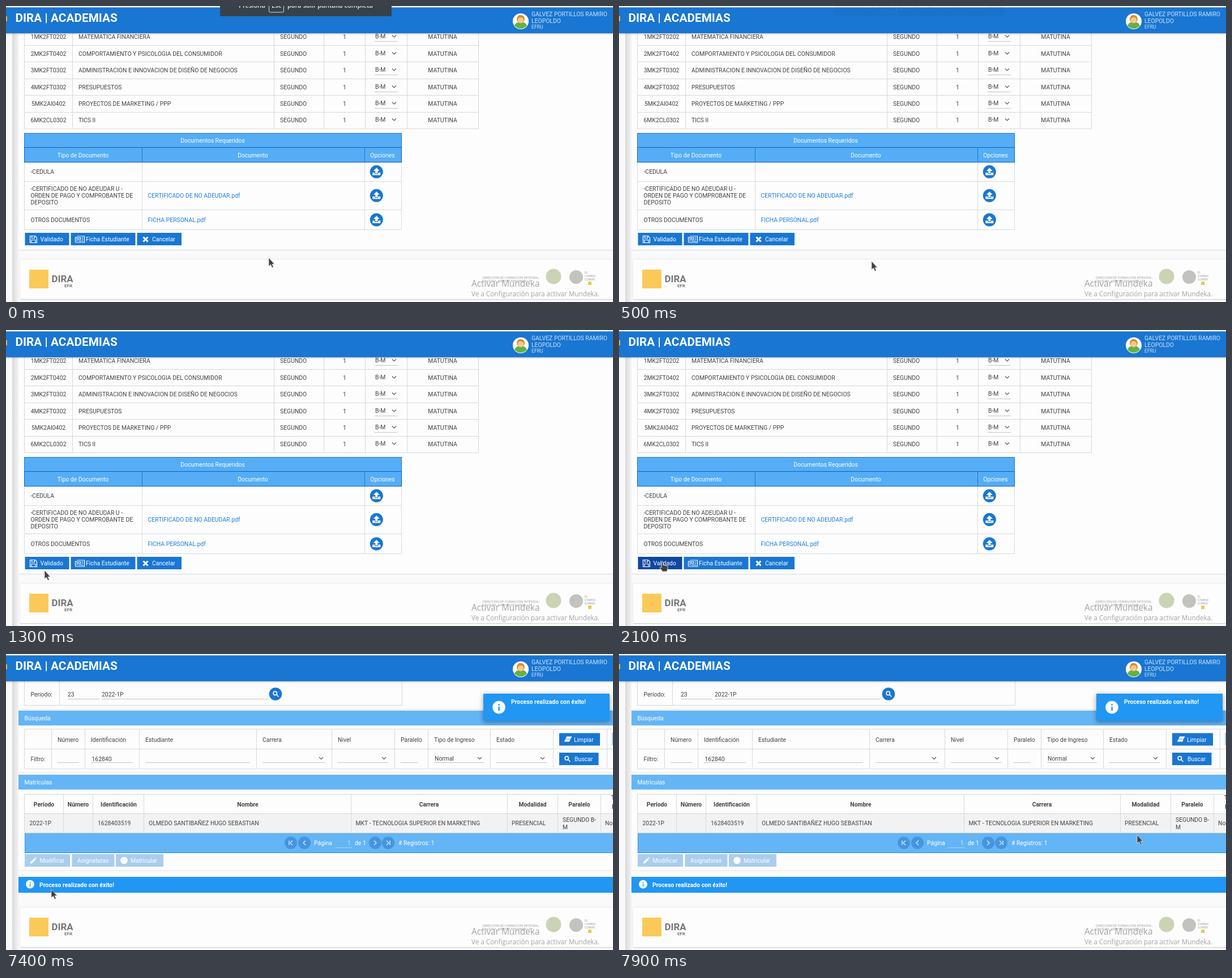
An HTML page that plays this animation: 1072 by 522 pixels, repeating every 8 s.

```html
<!DOCTYPE html>
<html lang="es">
<head>
<meta charset="utf-8">
<title>Matrículas</title>
<style>
html, body { margin: 0; width: 100%; height: 100%; overflow: hidden; background: #fafafa; }
svg { display: block; width: 100%; height: 100%; font: 10.4px Roboto, sans-serif; }
text { fill: #424242; white-space: pre; }
.w { fill: #fff; }
.b { font-weight: 700; }
.m { text-anchor: middle; }
.link { fill: #1e7fdb; }
.user { fill: #cfe2f6; }
.logo { font-weight: 700; fill: #777; }
.mark { font-family: "Open Sans", sans-serif; fill: #a3a3a3; }
.bar { font: 600 11.2px "Open Sans", sans-serif; fill: #eee; }
.crisp { shape-rendering: crispEdges; }
.shade { filter: drop-shadow(0 0 1.5px rgba(0,0,0,.14)); }
.head { filter: drop-shadow(0 1px 1.5px rgba(0,0,0,.3)); }
.toast { filter: drop-shadow(0 2px 4px rgba(0,0,0,.4)); }
</style>
</head>
<body>
<svg id="stage" viewBox="0 0 1072 522"></svg>
<script>
const BLUE = '#1976d2', DARK = '#0d47a1', EDGE = '#0f5fb8', SKY = '#64b5f6', INFO = '#2196f3';
const PALE = '#a9cdef', GRAY = '#d8d8d8', UNDER = '#c4c4c4';

const rect = (x, y, w, h, fill, more = '') =>
  `<rect x="${x}" y="${y}" width="${w}" height="${h}" fill="${fill}" ${more}/>`;
const text = (x, y, s, cls = '', size = '') =>
  `<text x="${x}" y="${y}" class="${cls}"${size && ` style="font-size:${size}px"`}>${s}</text>`;
const disc = (x, y, r, fill) => `<circle cx="${x}" cy="${y}" r="${r}" fill="${fill}"/>`;
const path = (d, fill = 'none', stroke = 'none', width = 1, x = 0, y = 0) =>
  `<path d="${d}" fill="${fill}" stroke="${stroke}" stroke-width="${width}" transform="translate(${x} ${y})"/>`;
const hline = (x1, x2, y, c = GRAY) => rect(x1, y, x2 - x1, 1, c, 'class="crisp"');
const vline = (x, y1, y2, c = GRAY) => rect(x, y1, 1, y2 - y1, c, 'class="crisp"');
const grid = (xs, ys, c) =>
  xs.map(x => vline(x, ys[0], ys.at(-1) + 1, c)).join('') +
  ys.map(y => hline(xs[0], xs.at(-1), y, c)).join('');
const card = (y, h, x = 22) => rect(x, y, 1060, h, '#fdfdfd', 'class="shade"');
const chevron = (x, y) => path('M-3.5 -2L0 1.5L3.5 -2', 'none', '#555', 1.1, x, y);
const button = (x, y, w, label, labelX, fill = BLUE, id = '') =>
  rect(x, y, w, 22, fill, id && `id="${id}"`) + text(labelX, y + 15, label, 'w');
const lens = (x, y) => path('M1.3 1.3L5 5M2 -1.2A3.2 3.2 0 1 1 -4.4 -1.2A3.2 3.2 0 1 1 2 -1.2', 'none', '#fff', 1.6, x, y);
const info = (x, y, r) => disc(x, y, r, '#fff') +
  rect(x - r * .1, y - r * .1, r * .22, r * .62, INFO) + rect(x - r * .1, y - r * .52, r * .22, r * .24, INFO);
const upload = y => disc(654.3, y, 11.5, BLUE) +
  path('M0 -7L5.5 -1.5H2V3H-2V-1.5H-5.5Z M-7 1.5H-3V4H3V1.5H7V6H-7Z', '#fff', 'none', 1, 654.3, y);

function enrolForm() {
  const subjects = [
    ['1MK2FT0202', 'MATEMATICA FINANCIERA'],
    ['2MK2FT0402', 'COMPORTAMIENTO Y PSICOLOGIA DEL CONSUMIDOR'],
    ['3MK2FT0302', 'ADMINISTRACION E INNOVACION DE DISEÑO DE NEGOCIOS'],
    ['4MK2FT0302', 'PRESUPUESTOS'],
    ['5MK2AI0402', 'PROYECTOS DE MARKETING / PPP'],
    ['6MK2CL0302', 'TICS II']];
  const rows = subjects.map(([code, name], i) => {
    const y = Math.round(58.4 + i * 29.4);
    return text(75, y, code, 'm') + text(128, y, name) + text(484, y, 'SEGUNDO') +
      text(598, y, '1', 'm') + text(652, y - 1, 'B-M') + chevron(685.5, y - 4.5) +
      (i % 5 == 1 || i == 5 ? '' : hline(651, 692, y + 4, UNDER)) + text(771, y, 'MATUTINA', 'm');
  }).join('');
  return card(40, 390) + hline(22, 1072, 430, '#d5e3ee') +
    grid([32, 117, 473, 561, 634, 708, 834], [40, 69, 98, 128, 157, 187, 216]) + rows +
    rect(32, 225, 666, 50, '#55adf5') + grid([32, 240, 633, 698], [275, 309, 359, 394], '#d3dbe3') +
    grid([32, 698], [224, 249], BLUE) + grid([32, 698], [249, 275], EDGE) +
    vline(240, 249, 275, BLUE) + vline(633, 249, 275, BLUE) +
    text(365, 241, 'Documentos Requeridos', 'w m') + text(136, 267, 'Tipo de Documento', 'w m') +
    text(436, 267, 'Documento', 'w m') + text(665, 267, 'Opciones', 'w m') +
    text(43.5, 296, '-CEDULA') + text(43.5, 326, '-CERTIFICADO DE NO ADEUDAR U -') +
    text(43.5, 338, 'ORDEN DE PAGO Y COMPROBANTE DE') + text(43.5, 350, 'DEPOSITO') +
    text(43.5, 381, 'OTROS DOCUMENTOS') +
    text(250.5, 338, 'CERTIFICADO DE NO ADEUDAR.pdf', 'link') + text(250.5, 381, 'FICHA PERSONAL.pdf', 'link') +
    [292.3, 334.3, 377].map(upload).join('') +
    button(33.5, 400, 78, 'Validado', 60.5, BLUE, 'validate') +
    button(114.5, 400, 114, 'Ficha Estudiante', 141) + button(231.5, 400, 78.5, 'Cancelar', 258) +
    path('M0 0H9L12 3V12H0ZM3 0V4H8V0M2.5 12V7H9.5V12', 'none', '#fff', 1.2, 42.5, 405.5) +
    path('M3 0H16V11H1Q0 11 0 9V2H3V9M5.5 2.5H9V6H5.5ZM11 3H14M11 5.5H14M5.5 8.5H14', 'none', '#fff', 1.2, 122.5, 406) +
    path('M0 0L8 8M8 0L0 8', 'none', '#fff', 3, 242.5, 407.5);
}

function searchPage() {
  const fields = [
    ['Número', 91, 129], ['Identificación', 150, 224], ['Estudiante', 246, 431],
    ['Carrera', 453, 564, 1], ['Nivel', 586, 675, 1], ['Paralelo', 697, 727],
    ['Tipo de Ingreso', 756, 844, 1], ['Estado', 866, 955, 1]];
  const heads = [['Período', 67], ['Número', 127.5], ['Identificación', 199], ['Nombre', 427],
    ['Carrera', 747], ['Modalidad', 930], ['Paralelo', 1012.5]];
  const pagers = [[503, 'M-3 -4V4M3 -4L-1 0L3 4'], [527, 'M2 -4L-2 0L2 4'],
    [652, 'M-2 -4L2 0L-2 4'], [675, 'M3 -4V4M-3 -4L1 0L-3 4']];
  return card(40, 57) + grid([32, 94, 699], [40, 90]) +
    text(43.5, 74.5, 'Período:') + text(109, 74.5, '23') + text(169, 74.5, '2022-1P') +
    hline(109, 165, 79, UNDER) + hline(169, 463, 79, UNDER) + disc(476, 70.5, 11.3, BLUE) + lens(476.5, 70.5) +
    card(100, 108) + rect(22, 100, 1050, 26, SKY) + text(32.5, 116.5, 'Búsqueda', 'w') +
    grid([32, 80, 139, 235, 442, 575, 686, 745, 855, 966, 1061, 1080], [132, 167, 202]) +
    fields.map(([name, x1, x2, list]) => text(x1, 154.5, name) + hline(x1, x2, 191, UNDER) +
      (list ? chevron(x2 - 7.5, 184) : '')).join('') +
    text(43.5, 189, 'Filtro:') + text(151.5, 189, '162840') + text(757, 188.3, 'Normal') +
    button(977, 139.5, 72, 'Limpiar', 1003) + button(977, 174, 69.5, 'Buscar', 1004) +
    path('M5 0H15L10 10H0ZM2.5 5H12.5', '#fff', BLUE, .8, 985, 145) + lens(991.5, 185) +
    rect(1070, 139, 2, 22, PALE) + hline(1071, 1072, 191) +
    card(213, 168) + rect(22, 213, 1050, 26, SKY) + text(32.5, 229.5, 'Matrículas', 'w') +
    rect(33, 282, 1040, 33, '#f3f2f2') +
    grid([32, 101, 153, 243, 609, 885, 974, 1050, 1080], [247, 281, 315]) +
    heads.map(([s, x]) => text(x, 268.5, s, 'b m')).join('') +
    text(1069, 257, 'Tipo', 'b') + text(1070, 273, 'Ingreso', 'b') +
    text(41.5, 302, '2022-1P') + text(162, 302, '1628403519') +
    text(252, 302, 'OLMEDO SANTIBAÑEZ HUGO SEBASTIAN') +
    text(617.5, 302, 'MKT - TECNOLOGIA SUPERIOR EN MARKETING') + text(893, 302, 'PRESENCIAL') +
    text(983, 296, 'SEGUNDO B-') + text(983, 308.5, 'M') + text(1058, 302, 'Normal') +
    rect(33, 316, 1040, 34, SKY) + vline(33, 316, 351, INFO) + hline(33, 1072, 350, '#1e88e5') +
    pagers.map(([x, d]) => disc(x, 333, 11, '#4595df') + path(d, 'none', '#d6e9fb', 1.4, x, 333)).join('') +
    text(544, 337, 'Página', 'w') + text(603, 337, '1', 'user') + hline(581, 611, 341, '#a5d2f8') +
    text(616, 337, 'de 1', 'w') + text(693, 337, '# Registros: 1', 'w') +
    button(33, 353, 80, 'Modificar', 59.5, PALE) + button(116.5, 353, 75, 'Asignaturas', 126, PALE) +
    button(194, 353, 84, 'Matricular', 220, PALE) + disc(208.5, 364, 6.3, '#fff') +
    path('M0 8L7 1L9.5 3.5L2.5 10.5H0ZM8 0L9 -1L11.5 1.5L10.5 2.5Z', '#fff', 'none', 1, 43, 359) +
    rect(22, 393, 1050, 28, INFO) + info(42.5, 406, 7.5) + text(59, 410.7, 'Proceso realizado con éxito!', 'w b') +
    rect(843, 70, 223, 48, INFO, 'class="toast"') +
    info(870.5, 94, 11.3) + text(892, 87.5, 'Proceso realizado con éxito!', 'w b');
}

const footer = () =>
  card(447, 70, 25) + hline(25, 1072, 517, '#cfcfcf') + rect(41, 465, 34, 33, '#fbc95a') +
  text(80.5, 487, 'DIRA', 'logo', 16.9) + text(103, 496, 'EFR', 'logo', 8) +
  `<g opacity=".5">${text(842, 480.5, 'DIRECCIÓN DE FORMACIÓN INTEGRAL,', '', 5.7)}
   ${text(842, 486.5, 'CULTURA, ARTES Y DESARROLLO', '', 5.7)}
   ${text(1022, 472, 'EL', '', 5)}${text(1022, 478, 'CAMINO', '', 5)}${text(1022, 484, 'COMÚN', '', 5)}</g>` +
  disc(967, 477, 13.5, '#cad3b4') + disc(1007, 478, 12, '#c2c2be') + rect(1028, 486, 6, 6, '#ecc94f') +
  text(822, 494.5, 'Activar Mundeka', 'mark', 15.4) +
  text(822, 512, 'Ve a Configuración para activar Mundeka.', 'mark', 11.7);

const header = () =>
  rect(11, 47, 11, 475, 'url(#side)') + rect(0, 47, 11, 475, '#f9f9f9') +
  rect(0, 0, 1072, 3, '#fdfdfd') + rect(0, 2.5, 1072, 45.5, BLUE, 'class="head"') + rect(0, 18, 2, 9, '#f5b731') +
  text(16.5, 28, 'DIRA | ACADEMIAS', 'w b', 20.8) +
  disc(909, 27, 14, '#fff') + path('M-11 8Q-9 1 0 1Q9 1 11 8Q6 13 0 13Q-6 13 -11 8Z', '#62b245', 'none', 1, 909, 27) +
  disc(909, 23, 7, '#d98b2b') + disc(909, 25, 5.3, '#f8c98d') +
  text(928, 17.5, 'GALVEZ PORTILLOS RAMIRO', 'user') + text(928, 30, 'LEOPOLDO', 'user') + text(928, 40.3, 'EFRU', 'user', 8.6);

const banner = () => rect(378, -20, 303, 38, '#38414a', 'rx="2"') +
  text(411, 2.5, 'Presiona', 'bar') + text(469, 2.5, 'Esc', 'bar') + text(497, 2.5, 'para salir pantalla completa', 'bar') +
  rect(464.5, -12, 26, 23, 'none', 'rx="2" stroke="#ddd"');

const $ = id => document.getElementById(id);
$('stage').innerHTML =
  `<defs><linearGradient id="side"><stop stop-color="#d9d9d9"/><stop offset="1" stop-color="#f3f3f3"/></linearGradient></defs>
  ${rect(0, 0, 1072, 522, '#fafafa')}
  <g id="form">${enrolForm()}</g><g id="search">${searchPage()}</g>${footer()}${header()}<g id="banner">${banner()}</g>
  <g id="arrow">${path('M0 0V15L3.4 12L6 17.5L8.4 16.4L5.9 11.2H10.3Z', '#414141', '#f4f4f4', .7)}</g>
  <g id="hand">${path('M5 1.5Q6.5 0 8 1.5V6.5Q9.5 5.8 10.6 7Q12 6.4 13.2 7.8Q15 7.2 16 9V13L14.5 18H7L2 11.5Q2.4 9.6 5 11Z', '#404040', '#f4f4f4', .9)}</g>`;

// Pointer keys: time, x, y
const moves = [[0, 464, 444], [200, 464, 454], [500, 446, 450], [700, 300, 470], [900, 32, 486],
  [1100, 46, 462], [1300, 68, 424], [1500, 68, 409], [1600, 68, 407], [2000, 68, 407], [2200, 72, 409],
  [2400, 72, 409], [2500, 75, 412], [2600, 75, 412], [2700, 77, 415], [7399, 77, 415],
  [7400, 80, 415], [7500, 110, 412], [7600, 300, 390], [7800, 800, 332], [7900, 915, 319]];
const fade = [1, .85, .6, .35, .16, .05];

function pointerAt(t) {
  const i = Math.max(1, moves.findIndex(m => m[0] >= t));
  const [t0, x0, y0] = moves[i - 1], [t1, x1, y1] = moves[i];
  const k = (t - t0) / (t1 - t0);
  return `translate(${x0 + (x1 - x0) * k} ${y0 + (y1 - y0) * k})`;
}
const show = (id, on) => $(id).setAttribute('display', on ? 'inline' : 'none');

const start = performance.now();
function draw() {
  const t = Math.floor((performance.now() - start) % 8000 / 100) * 100;
  const done = t >= 7400, over = t >= 1500 && !done;
  show('form', !done);
  show('search', done);
  show('hand', over);
  show('arrow', !over);
  $('validate').setAttribute('fill', over ? DARK : BLUE);
  $('banner').setAttribute('opacity', fade[t / 100] ?? 0);
  $(over ? 'hand' : 'arrow').setAttribute('transform', pointerAt(t));
  requestAnimationFrame(draw);
}
draw();
</script>
</body>
</html>
```
